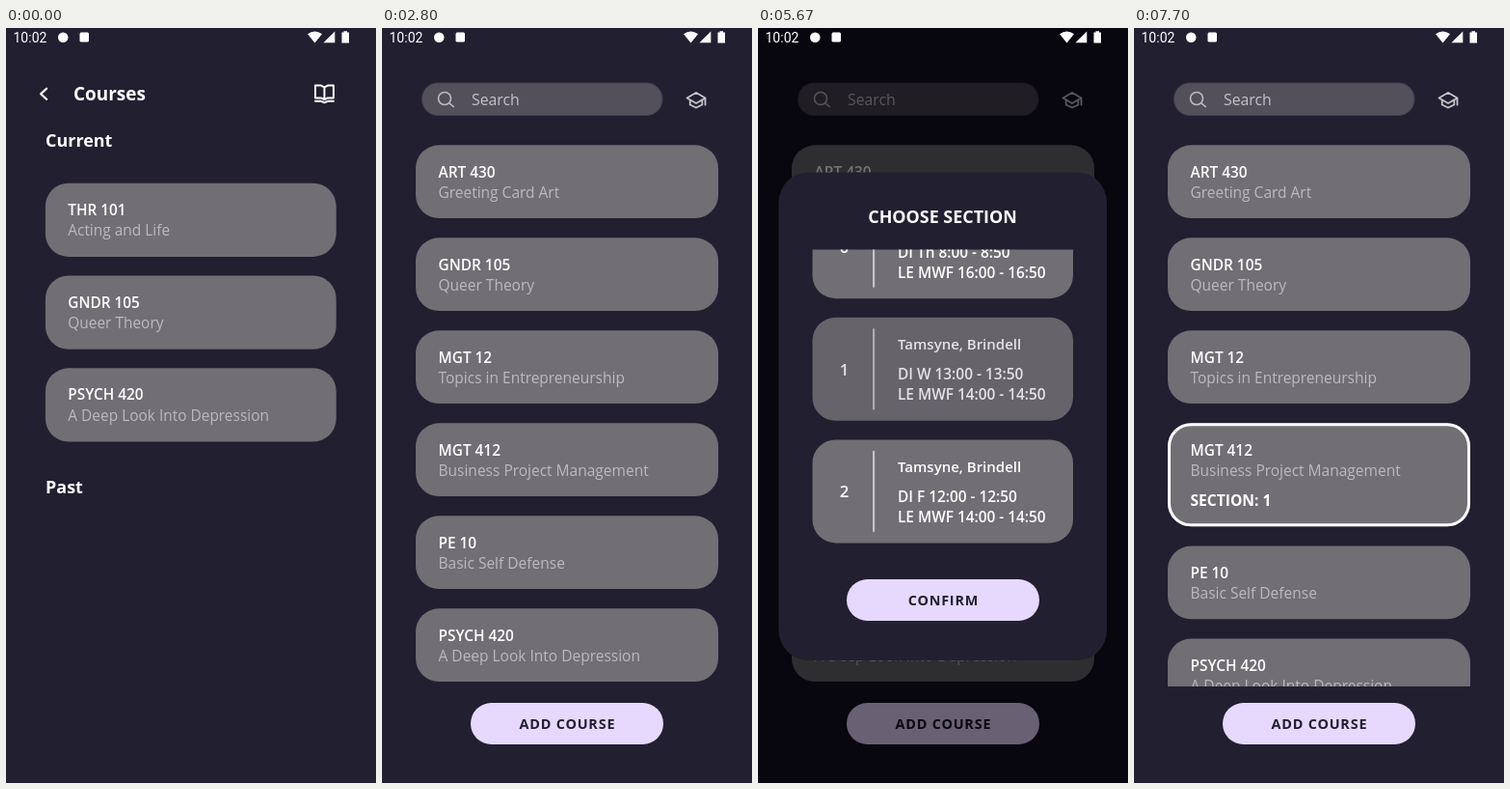
An HTML page with a canvas for the animation above (8 s loop, 384 by 782 pixels).

```html
<!DOCTYPE html>
<html lang="en">
<head>
<meta charset="utf-8">
<title>Course picker</title>
<style>
  html, body { margin: 0; width: 100%; height: 100%; overflow: hidden; background: #221f31; }
  canvas { display: block; width: 100vw; height: 100vh; }
</style>
</head>
<body>
<canvas id="stage"></canvas>
<script>
const W = 384, H = 782, LOOP = 8000, STEP = 70;
const BG = '#221f31', CARD = '#716e74', SOFT = '#bcbabf', LILAC = '#e6d9fd', WHITE = '#fff';
const FONT = '"Open Sans", "Noto Sans", sans-serif';

const dpr = window.devicePixelRatio || 1;
let g = sized(document.getElementById('stage'));

const enrolled = [
  ['THR 101', 'Acting and Life'],
  ['GNDR 105', 'Queer Theory'],
  ['PSYCH 420', 'A Deep Look Into Depression']
];
const catalog = [
  ['ART 430', 'Greeting Card Art'],
  ['GNDR 105', 'Queer Theory'],
  ['MGT 12', 'Topics in Entrepreneurship'],
  ['MGT 412', 'Business Project Management'],
  ['PE 10', 'Basic Self Defense'],
  ['PSYCH 420', 'A Deep Look Into Depression']
];
const teacher = 'Tamsyne, Brindell';
const sections = [
  ['DI Th 8:00 - 8:50', 'LE MWF 16:00 - 16:50'],
  ['DI W 13:00 - 13:50', 'LE MWF 14:00 - 14:50'],
  ['DI F 12:00 - 12:50', 'LE MWF 14:00 - 14:50']
];

// Values over time, linear between points
const scrollTrack = [[5110, 0], [5180, 38.2], [5250, 52], [5320, 60], [5390, 64.5], [5460, 66],
  [5670, 66], [5740, 57], [5810, 51]];
const pressTrack = [[5530, 1], [5600, .94], [5670, .87], [5740, .88], [5810, .96], [5950, 1],
  [6370, 1], [6440, .8], [6510, .7], [6580, .88], [6650, 1]];
const modalTrack = [[3990, 0], [4060, .5], [4130, 1], [7490, 1], [7560, .65], [7630, .25], [7700, 0]];
const confirmTrack = [[7280, 1], [7350, .8], [7420, .65], [7490, .8], [7560, 1]];

function sized(canvas) {
  canvas.width = W * dpr;
  canvas.height = H * dpr;
  const c = canvas.getContext('2d');
  c.scale(dpr, dpr);
  return c;
}

function track(t, points) {
  if (t <= points[0][0]) return points[0][1];
  for (let i = 1; i < points.length; i++) {
    const [t0, a] = points[i - 1], [t1, b] = points[i];
    if (t <= t1) return a + (b - a) * (t - t0) / (t1 - t0);
  }
  return points[points.length - 1][1];
}

const clamp = v => Math.max(0, Math.min(1, v));

function ease(x) {
  if (x <= 0 || x >= 1) return clamp(x);
  const bez = (a, b, s) => 3 * a * s * (1 - s) ** 2 + 3 * b * s * s * (1 - s) + s ** 3;
  let lo = 0, hi = 1;
  for (let i = 0; i < 24; i++) {
    const mid = (lo + hi) / 2;
    if (bez(.20833, .25, mid) < x) lo = mid; else hi = mid;
  }
  return bez(.82, 1, lo);
}

// Draws a group with one common opacity
function layer(alpha, draw) {
  if (alpha <= 0) return;
  if (alpha >= 1) return draw();
  const parent = g, canvas = document.createElement('canvas');
  g = sized(canvas);
  draw();
  g = parent;
  g.globalAlpha = alpha;
  g.drawImage(canvas, 0, 0, W, H);
  g.globalAlpha = 1;
}

function zoomed(scale, draw) {
  g.save();
  g.translate(W / 2, H / 2);
  g.scale(scale, scale);
  g.translate(-W / 2, -H / 2);
  draw();
  g.restore();
}

function clipped(x, y, w, h, draw) {
  g.save();
  g.beginPath();
  g.rect(x, y, w, h);
  g.clip();
  draw();
  g.restore();
}

function text(s, x, y, size, weight = 600, color = WHITE, align = 'left') {
  g.font = `${weight} ${size}px ${FONT}`;
  g.fillStyle = color;
  g.textAlign = align;
  g.fillText(s, x, y);
}

function box(x, y, w, h, r, color) {
  g.beginPath();
  g.roundRect(x, y, w, h, r);
  g.fillStyle = color;
  g.fill();
}

function outline(x, y, w, h, r) {
  g.beginPath();
  g.roundRect(x + 1.5, y + 1.5, w - 3, h - 3, r - 1.5);
  g.strokeStyle = WHITE;
  g.lineWidth = 3;
  g.stroke();
}

function line(d, color, width) {
  g.strokeStyle = color;
  g.lineWidth = width;
  g.lineCap = g.lineJoin = 'round';
  g.stroke(new Path2D(d));
}

function fillPath(d, color) {
  g.fillStyle = color;
  g.fill(new Path2D(d));
}

function fillStage(color) {
  g.fillStyle = color;
  g.fillRect(0, 0, W, H);
}

function button(label, y) {
  box(92, y, 200, 43, 21.5, LILAC);
  g.letterSpacing = '0.8px';
  text(label, 192.4, y + 27, 14.4, 700, BG, 'center');
  g.letterSpacing = '0px';
}

function courseCard([code, name], x, y, w, h) {
  box(x, y, w, h, 24, CARD);
  text(code, x + 23.5, y + 33.2, 15.4);
  text(name, x + 23.5, y + 54.5, 15.5, 400, SOFT);
}

function coursesScreen() {
  fillStage(BG);
  line('M41.5 61.5L35.5 67L41.5 72.5', WHITE, 2.3);
  text('Courses', 69.5, 73.6, 19, 700);
  line('M331 60.2L327.5 58.3H321.5V71.3H327.5L331 72.8L334.5 71.3H340.5V58.3H334.5L331 60.2V72' +
    'M321.5 74.6H327.5L331 76L334.5 74.6H340.5', WHITE, 2);
  text('Current', 40.5, 122, 18, 700);
  enrolled.forEach((c, i) => courseCard(c, 40.3, 159.8 + 96.2 * i, 303, 76.5));
  text('Past', 40.5, 482, 18, 700);
}

function searchScreen(picked) {
  fillStage(BG);
  box(41, 56.5, 250.5, 34.5, 17.2, '#45424f');
  box(42, 57.5, 248.5, 32.5, 16.2, '#53505c');
  line('M71.5 73A6.5 6.5 0 1 1 58.5 73A6.5 6.5 0 1 1 71.5 73M69.8 77.8L74.3 81.5', SOFT, 1.6);
  text('Search', 93, 79.8, 15.8, 400, '#c4c2c8');
  line('M316.5 72.5L326 67L335.5 72.5L326 78ZM335.5 72.5V79.5M319.7 75V79.5L326 82.5L332.3 79.5V75', '#c6c4ca', 1.8);
  clipped(0, 100, W, 582, () => {
    let y = 121.3;
    catalog.forEach((c, i) => {
      const on = picked && i === 3, h = on ? 107 : 75.7;
      courseCard(c, 35, y, 314, h);
      if (on) {
        outline(35, y, 314, h, 24);
        text('SECTION: 1', 58.5, y + 85.2, 15.6, 700);
      }
      y += h + 20.3;
    });
  });
  button('ADD COURSE', 699);
}

function sectionCard(i, y, picked) {
  box(56.5, y, 270.5, 107, 24, CARD);
  if (picked) outline(56.5, y, 270.5, 107, 24);
  text(i, 89.5, y + 60, 16.8, 600, WHITE, 'center');
  g.fillStyle = '#c4c2c7';
  g.fillRect(119, y + 11.5, 2.2, 84);
  text(teacher, 145, y + 33.5, 15);
  text(sections[i][0], 145, y + 64.5, 15.4);
  text(sections[i][1], 145, y + 85.5, 15.4);
}

function modal(t) {
  const shift = track(t, scrollTrack);
  box(21.5, 149.5, 340.5, 505.5, 31, BG);
  text('CHOOSE SECTION', 191.5, 201.8, 17.9, 700, WHITE, 'center');
  clipped(56, 229.5, 272, 313.5, () => {
    sections.forEach((_, i) => {
      const alpha = i === 1 ? track(t, pressTrack) : 1;
      layer(alpha, () => sectionCard(i, 239.2 - shift + 126.6 * i, i === 1 && t >= 6510));
    });
  });
  layer(track(t, confirmTrack), () => button('CONFIRM', 571));
}

function dim(amount) {
  fillStage(`rgba(0,0,0,${.51 * amount})`);
  g.globalCompositeOperation = 'difference';
  const v = Math.round(9 * amount);
  fillStage(`rgb(${v},${v},${v})`);
  g.globalCompositeOperation = 'source-over';
}

function statusBar() {
  g.font = '14px Roboto, sans-serif';
  g.fillStyle = WHITE;
  g.textAlign = 'left';
  g.fillText('10:02', 7.5, 14.5);
  box(54, 4.5, 10.5, 10.5, 5.25, WHITE);
  box(76.5, 4.5, 9.5, 10, 1.5, WHITE);
  fillPath('M313 6.2Q320.5 0.6 328 6.2L320.5 15.5Z', WHITE);
  fillPath('M341.3 3.5V15.3H329.5Z', WHITE);
  fillPath('M348.5 4.6H350.5V3.3H354V4.6H356V15.6H348.5Z', WHITE);
}

function draw(t) {
  fillStage(BG);
  const arrive = ease((t + 250) / 400);
  const swap = ease((t - 2029) / 400);
  if (swap < 1) {
    layer(1 - clamp((swap - .2075) / .7925), () =>
      zoomed(.85 + .15 * arrive + .1 * swap, coursesScreen));
  }
  if (swap > 0) {
    layer(clamp((swap - .75) / .125), () =>
      zoomed(.85 + .15 * swap, () => searchScreen(t >= 7560)));
  }
  const shown = track(t, modalTrack);
  if (shown > 0) {
    dim(shown);
    layer(shown, () => modal(t));
  }
  statusBar();
}

// The screen refreshes in even 70 ms ticks
const start = performance.now();
function tick() {
  const t = (performance.now() - start) % LOOP;
  draw(Math.floor(t / STEP) * STEP);
  requestAnimationFrame(tick);
}
tick();
</script>
</body>
</html>
```
